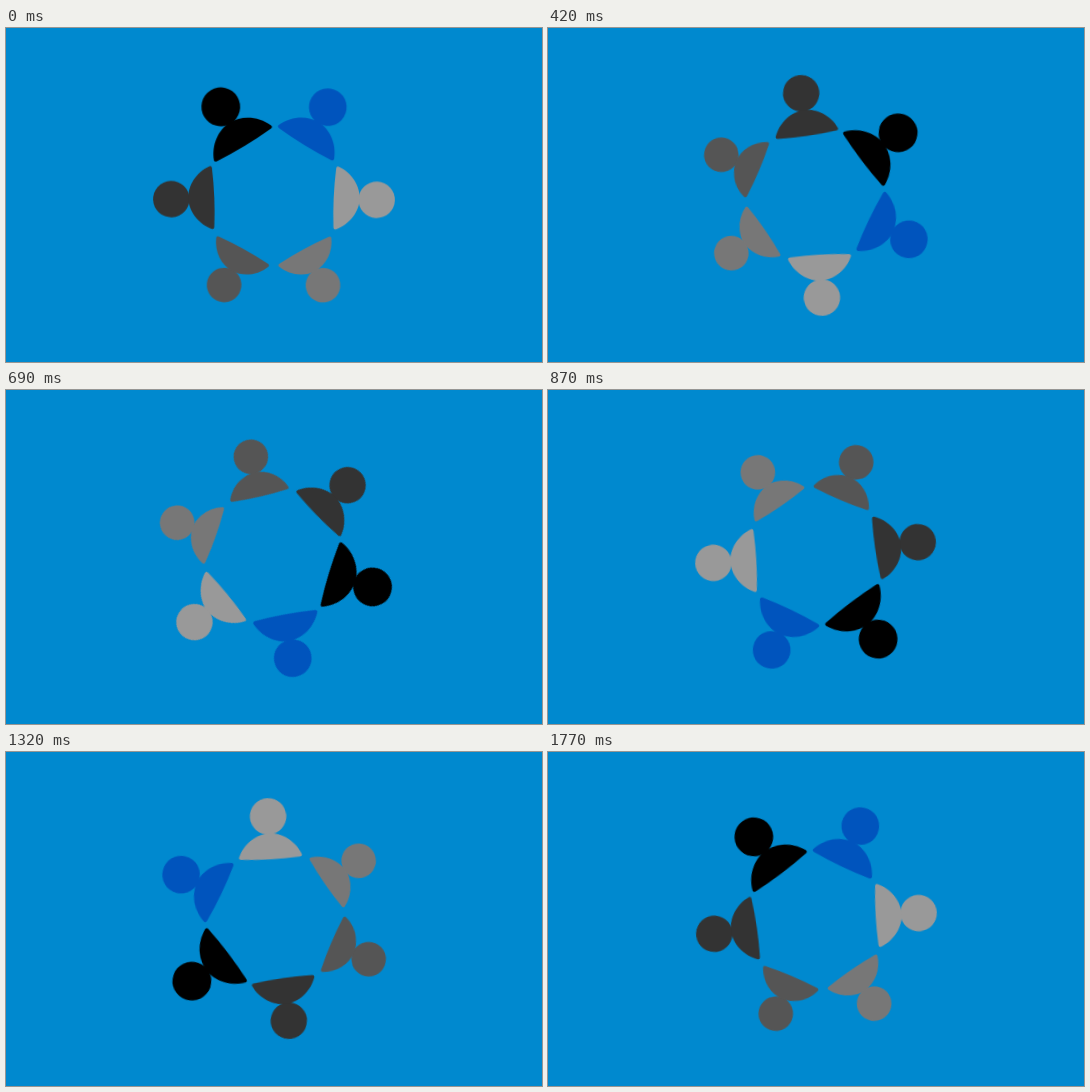
These frames come from a looping animation (536x334 px, 1800 ms). An HTML page without scripts:

```html
<!DOCTYPE html>
<html lang="en">
<head>
<meta charset="utf-8">
<title>Circle of people</title>
<style>
  html, body {
    margin: 0;
    width: 100%;
    height: 100%;
    overflow: hidden;
    background: #0089cf;
  }
  svg {
    display: block;
    width: 536px;
    height: 334px;
  }
  .ring {
    transform-origin: 0 0;
    animation: spin 1800ms linear infinite;
  }
  @keyframes spin {
    to { transform: rotate(360deg); }
  }
</style>
</head>
<body>
<svg viewBox="-268 -167 536 334">
  <defs>
    <!-- head at the origin, shoulders facing the ring centre -->
    <g id="person">
      <circle r="18.2"/>
      <path d="M-31.4 39.5C-26 26 -13 17 0 17S26 26 31.4 39.5Q32 41.7 29.5 41.9Q0 44.2 -29.5 41.9Q-32 41.7 -31.4 39.5Z"/>
    </g>
  </defs>
  <g class="ring">
    <use href="#person" fill="#000" transform="rotate(-31.3) translate(0 -103) scale(1.065)"/>
    <use href="#person" fill="#0054bd" transform="rotate(31.3) translate(0 -103) scale(1.035)"/>
    <use href="#person" fill="#999" transform="rotate(92.5) translate(0 -102.8)"/>
    <use href="#person" fill="#777" transform="rotate(151.3) translate(0 -102.7) scale(.95)"/>
    <use href="#person" fill="#555" transform="rotate(208.8) translate(0 -102.9) scale(.95)"/>
    <use href="#person" fill="#333" transform="rotate(-92.5) translate(0 -102.8)"/>
  </g>
</svg>
</body>
</html>
```
